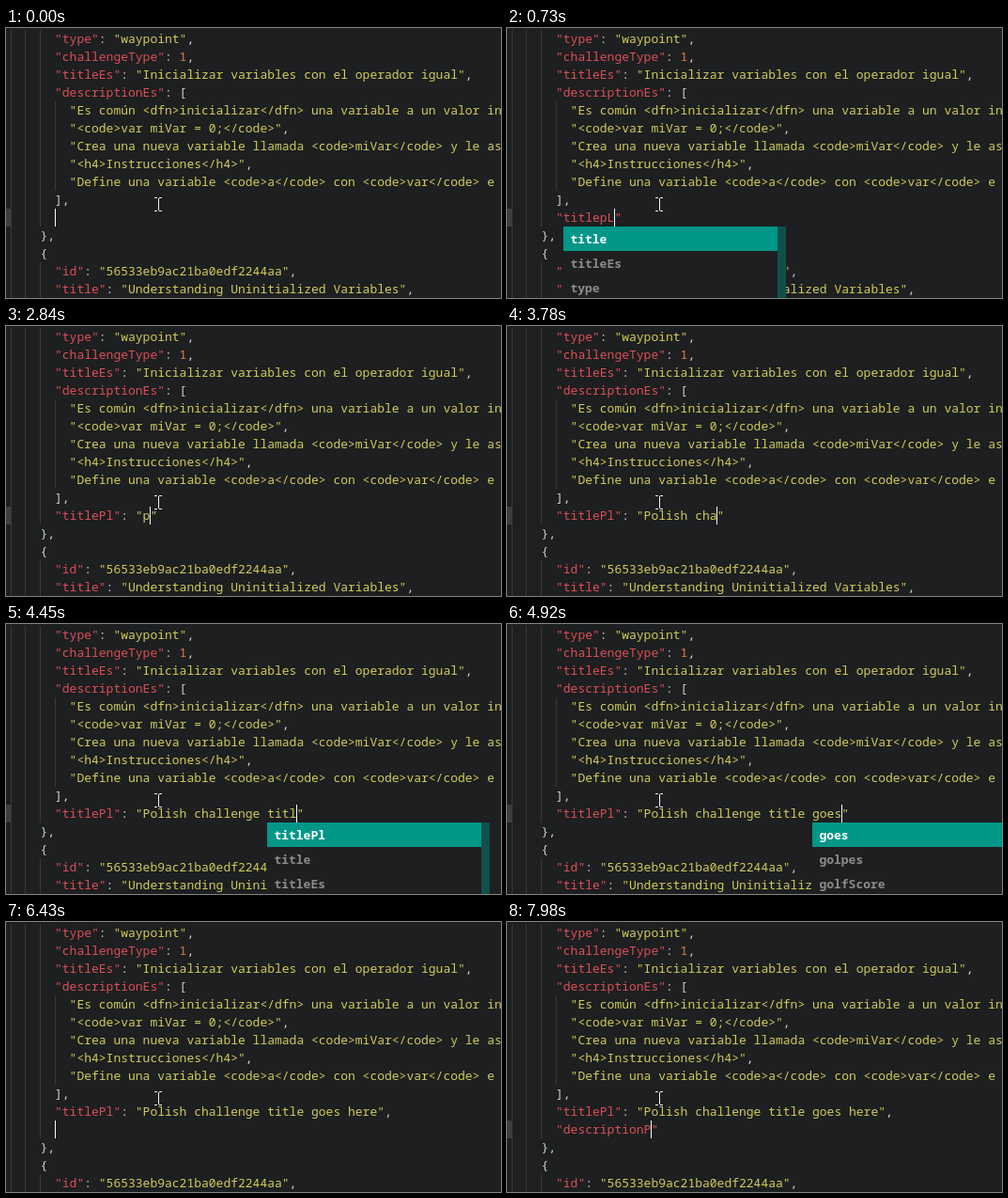
These frames come from a looping animation (527 by 287 pixels, 8000 ms). An HTML page with a canvas:

```html
<!DOCTYPE html>
<html lang="es">
<head>
<meta charset="utf-8">
<title>Typing in a JSON file</title>
<style>
  html, body { margin: 0; width: 100%; height: 100%; overflow: hidden; background: #1d1f20; }
  canvas { display: block; }
</style>
</head>
<body>
<canvas id="stage" width="527" height="287"></canvas>
<script>
const ctx = document.getElementById('stage').getContext('2d');
const LOOP = 8000, NEWLINE = 6430, CHAR = 7.8, LINE = 19, TOP = 2, ITEM = 26;
const FONT = '13px "Noto Sans Mono", "DejaVu Sans Mono", monospace';
const colors = {
  back: '#1d1f20', guide: '#37393b', gutter: '#3c3e41', plain: '#d0d3d0',
  key: '#dc4f58', string: '#d0cc5c', number: '#e2804a',
  selected: '#009688', scrollbar: '#11504a', item: '#8b8c8d'
};

const above = [
  '      "type": "waypoint",',
  '      "challengeType": 1,',
  '      "titleEs": "Inicializar variables con el operador igual",',
  '      "descriptionEs": [',
  '        "Es común <dfn>inicializar</dfn> una variable a un valor inicial',
  '        "<code>var miVar = 0;</code>",',
  '        "Crea una nueva variable llamada <code>miVar</code> y le asigna',
  '        "<h4>Instrucciones</h4>",',
  '        "Define una variable <code>a</code> con <code>var</code> e',
  '      ],'
];
const below = [
  '    },',
  '    {',
  '      "id": "56533eb9ac21ba0edf2244aa",',
  '      "title": "Understanding Uninitialized Variables",'
];
const finished = '"titlePl": "Polish challenge title goes here",';

// Edited line over time; "|" marks a visible caret.
const steps = [];
const at = (time, text, menu, column) => steps.push({ time, text, menu, column });
function type(start, gap, head, word, menu, typed = 0) {
  for (let n = typed + 1; n <= word.length; n++)
    at(start + (n - typed - 1) * gap, head + word.slice(0, n) + '|"', menu, head.length);
}

at(0, '|');
at(140, '"|"');
type(220, 80, '"', 'titlepL', ['title', 'titleEs', 'type', 'tests']);
at(790, '"titlepL|"');
at(1070, '"titlep|"');
at(1150, '"title|"');
at(1240, '"titleP|"');
at(1340, '"titleP|"', ['titlepL'], 1);
at(1440, '"titlePl|"', ['titlepL'], 1);
at(1530, '"titlePl"', ['titlepL'], 1);
at(1600, '"titlePl"|');
at(1700, '"titlePl":|');
at(1810, '"titlePl": |');

const open = '"titlePl": "';
at(2080, open + '|"');
type(2250, 170, open, 'po');
at(2700, open + 'p|"');
at(2850, open + '|"');
at(3000, open + '"');
at(3120, open + '|"');
type(3240, 60, open, 'Polish cha');
type(3850, 50, open + 'Polish ', 'challenge', ['challengeType', 'challengeSeed', 'chars'], 3);
at(4170, open + 'Polish challenge |"');
type(4310, 46, open + 'Polish challenge ', 'title', ['titlePl', 'title', 'titleEs', 'titlepL']);
at(4590, open + 'Polish challenge title |"');
type(4680, 80, open + 'Polish challenge title ', 'goes', ['goes', 'golpes', 'golfScore', 'good']);
at(5100, open + 'Polish challenge title goes|"');
at(5260, open + 'Polish challenge title goes |"');
type(5400, 90, open + 'Polish challenge title goes ', 'here', ['here', 'helpRoom', 'html', 'head']);
at(5900, finished.slice(0, -1) + '|');
at(6140, finished + '|');

at(NEWLINE, '|');
at(6820, '');
at(7000, '"|"');
type(7140, 140, '"', 'des', ['descriptionEs', 'description', 'dfn']);
at(7620, '"descriptionEs|"');
at(7800, '"description|"');
at(7980, '"descriptionP|"');

const columnX = column => 5.2 + column * CHAR;
const rowY = row => TOP + row * LINE;

function box(color, x, y, w, h) {
  ctx.fillStyle = color;
  ctx.fillRect(Math.floor(x), y, w, h);
}

// Letters sit on the editor's character grid.
function write(text, x, y, color) {
  ctx.fillStyle = color;
  [...text].forEach((c, i) => ctx.fillText(c, x + i * CHAR, y));
}

function drawLine(line, row) {
  const indent = line.search(/\S|$/), y = rowY(row);
  for (let c = 0; c < indent; c += 2) box(colors.guide, columnX(c), y, 1, LINE);
  for (const { 0: token, index } of line.matchAll(/"[^"]*"?|\d+|[^"\d]+/g)) {
    const kind = token[0] === '"' ? (index === 6 ? 'key' : 'string')
      : /\d/.test(token) ? 'number' : 'plain';
    write(token, columnX(index), y + 14, colors[kind]);
  }
}

function drawMenu(items, x, y) {
  x = Math.round(x);
  const width = items.length > 3 ? 228 : 201;
  ctx.font = 'bold ' + FONT;
  items.forEach((item, i) => {
    const top = y + i * ITEM;
    box(i ? colors.back : colors.selected, x, top, width, ITEM);
    write(item, x + 7.4, top + 18, i ? colors.item : '#fff');
  });
  if (items.length > 3) box(colors.scrollbar, x + width, y, 9, items.length * ITEM);
}

function drawPointer() {
  ctx.strokeStyle = '#f2f2f2';
  ctx.lineWidth = 1;
  ctx.stroke(new Path2D('M158 180.5h3m2 0h3M162.5 181v13M158 194.5h3m2 0h3'));
}

function draw(time) {
  const { text, menu, column } = steps.findLast(s => s.time <= time);
  const row = time < NEWLINE ? 10 : 11, y = rowY(row);
  const indent = ' '.repeat(6), caret = text.indexOf('|');
  const lines = [...above, ...(row > 10 ? [indent + finished] : []),
    indent + text.replace('|', ''), ...below];

  box(colors.back, 0, 0, 527, 287);
  if (time < NEWLINE || time >= 6650) box(colors.gutter, 0, y, 5, LINE);
  ctx.font = FONT;
  lines.forEach(drawLine);
  if (caret >= 0) box('#f8f8f8', columnX(6 + caret), y, 1, LINE);
  if (menu) drawMenu(menu, columnX(6 + column), y + LINE);
  drawPointer();
}

function tick() {
  draw(performance.now() % LOOP);
  requestAnimationFrame(tick);
}
tick();
</script>
</body>
</html>
```
